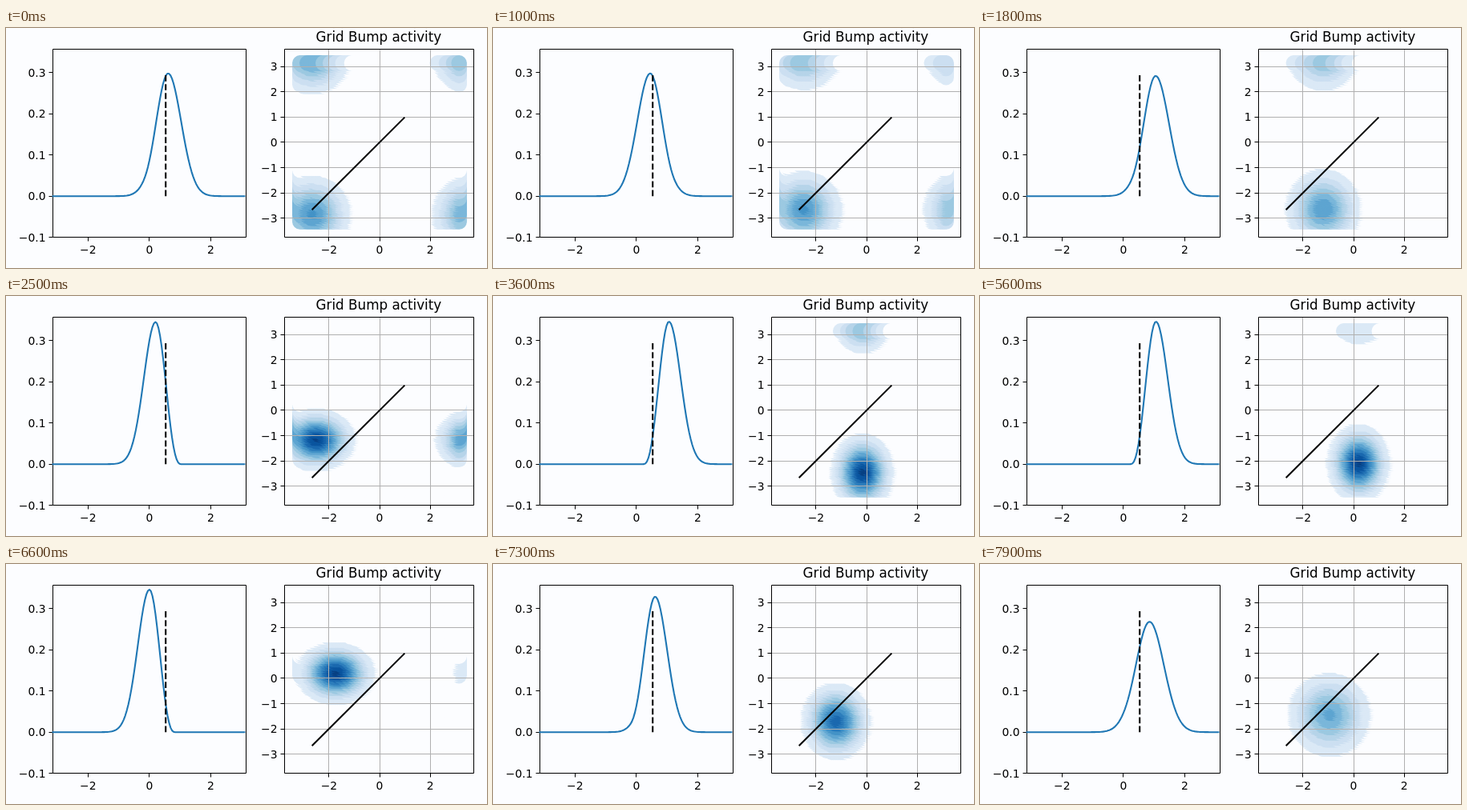
An HTML page with a canvas that plays this animation: 600x300 px, repeating every 8000 ms.

```html
<!DOCTYPE html>
<html lang="en">
<head>
<meta charset="utf-8">
<title>Grid Bump activity</title>
<style>
  html, body { margin: 0; width: 100%; height: 100%; overflow: hidden; background: #fcfdff; }
  canvas, svg { position: absolute; left: 0; top: 0; width: 600px; height: 300px; }
  text { font: 13.89px "DejaVu Sans", sans-serif; fill: #000; }
  .title { font-size: 16.78px; }
  .axis { fill: none; stroke: #000; stroke-width: 1; }
  .grid { fill: none; stroke: #b0b0b0; stroke-width: 1; }
  .bold { fill: none; stroke: #000; stroke-width: 2.08; }
  .curve { fill: none; stroke: #1f77b4; stroke-width: 2.08; stroke-linejoin: round; stroke-linecap: square; }
</style>
</head>
<body>
<canvas id="bump" width="600" height="300"></canvas>
<svg id="plot" viewBox="0 0 600 300"></svg>
<script>
const STEP = 100, STEPS = 80, TAU = 2 * Math.PI;
const BACK = "#fcfdff";

// One sweep lasts ten steps; sweeps alternate between left and right.
// A negative SHARP steepens the leading flank instead of the trailing one.
const SWING  = [-.08, -.02, .03, .08, .17, .33, .53, .6, .52, .32];
const HEIGHT = [.298, .308, .318, .329, .339, .345, .346, .328, .292, .268];
const SHARP  = [-.25, -.1, .2, .5, .8, 1, 1, .7, .3, .1];
const AHEAD  = [0, -.06, -.04, .15, .58, 1.23, 1.86, 2.1, 1.15, .29];
const ASIDE  = [0, -.05, -.1, -.17, -.24, -.29, -.26, -.22, -.12, -.02];

const leftX = v => 178.9 + 38.3 * v;
const leftY = v => 210.2 - 515 * v;
const rightX = v => 466 + 31.55 * v;
const rightY = v => 142.95 - 31.55 * v;
const snap = v => Math.floor(v) + .5;

const svg = document.getElementById("plot");
function add(tag, attrs, content) {
  const el = document.createElementNS("http://www.w3.org/2000/svg", tag);
  for (const name in attrs) el.setAttribute(name, attrs[name]);
  if (content) el.textContent = content;
  svg.append(el);
  return el;
}
const path = (cls, d) => add("path", { class: cls, d });
const label = (x, y, anchor, content) => add("text", { x, y, "text-anchor": anchor }, content);
const minus = s => String(s).replace("-", "\u2212");

function axes(x0, x1, toX, toY, yTicks, digits, grid) {
  let ticks = "", lines = "";
  for (const v of [-2, 0, 2]) {
    const x = snap(toX(v));
    ticks += `M${x} 261.5v5`;
    lines += `M${x} 26.5V261.5`;
    label(toX(v), 282, "middle", minus(v));
  }
  for (const v of yTicks) {
    const y = snap(toY(v));
    ticks += `M${x0} ${y}h-5`;
    lines += `M${x0} ${y}H${x1}`;
    label(x0 - 9, Math.round(toY(v) + 5.1), "end", minus(v.toFixed(digits)));
  }
  if (grid) path("grid", lines);
  path("axis", ticks + `M${x0} 26.5H${x1}V261.5H${x0}Z`);
}

axes(58.5, 299.5, leftX, leftY, [-.1, 0, .1, .2, .3], 1, false);
axes(347.5, 583.5, rightX, rightY, [-3, -2, -1, 0, 1, 2, 3], 0, true);
add("text", { class: "title", x: 464.9, y: 17, "text-anchor": "middle" }, "Grid Bump activity");
const curve = path("curve", "");
add("path", { class: "bold", d: `M199.2 ${leftY(0)}V58`, "stroke-dasharray": "7.7 3.33" });
add("path", { class: "bold", d: `M${rightX(-2.65)} ${rightY(-2.65)}L${rightX(.97)} ${rightY(.97)}`, "stroke-linecap": "square" });

const BLUES = ["f7fbff", "deebf7", "c6dbef", "9ecae1", "6baed6", "4292c6", "2171b5", "08519c", "08306b"]
  .map(hex => [0, 2, 4].map(i => parseInt(hex.slice(i, i + 2), 16)));

function blue(v) {
  const pos = Math.min(v, .999) * 8, i = Math.floor(pos), f = pos - i;
  return `rgb(${BLUES[i].map((c, n) => Math.round(c + (BLUES[i + 1][n] - c) * f))})`;
}
const EDGE = .06, BAND = .08;
const BANDS = Array.from({ length: 12 }, (_, i) => blue(.14 + i * BAND));
const shade = v => v < EDGE ? BACK : BANDS[Math.floor((v - EDGE) / BAND)];

function drawCurve(peak, dir, height, sharp) {
  const steep = Math.abs(sharp);
  const sigma = .125 / height * (1 + .05 * steep), points = [];
  for (let i = 0; i < 128; i++) {
    const x = -Math.PI + TAU * i / 128;
    const u = (x - peak) * dir;
    let y = Math.exp(-u * u / (2 * sigma * sigma));
    if (u * sharp < 0) {
      const cut = Math.abs(u) < .84 ? Math.cos(u / .84 * Math.PI / 2) ** 2.7 : 0;
      y += (cut - y) * steep;
    }
    points.push(leftX(x).toFixed(2) + " " + leftY(y * height).toFixed(2));
  }
  curve.setAttribute("d", "M" + points.join("L"));
}

const ctx = document.getElementById("bump").getContext("2d");
const wrap = d => d - TAU * Math.round(d / TAU);

// Overlapping discs on a periodic sheet, painted row by row from the bottom.
function drawBump(cx, cy, sx, sy, top) {
  const n = 90, at = i => -Math.PI + TAU * i / (n - 1);
  ctx.fillStyle = BACK;
  ctx.fillRect(0, 0, 600, 300);
  for (let j = 0; j < n; j++) {
    const dy = wrap(at(j) - cy) / sy;
    for (let i = 0; i < n; i++) {
      const dx = wrap(at(i) - cx) / sx;
      ctx.fillStyle = shade(top * Math.exp(-(dx * dx + dy * dy) / 2));
      ctx.beginPath();
      ctx.arc(rightX(at(i)), rightY(at(j)), 9.8, 0, TAU);
      ctx.fill();
    }
  }
}

function draw(step) {
  const i = step % 10, right = Math.floor(step / 10) % 2 === 1;
  const dir = right ? 1 : -1, h = HEIGHT[i], sharp = SHARP[i];
  drawCurve(.53 + dir * SWING[i], dir, h, sharp);

  const home = -2.58 + .018 * step;
  const main = home + AHEAD[i], side = home + ASIDE[i];
  const size = .217 / h, squeeze = Math.max(sharp, 0);
  const along = size * (1 - .14 * squeeze), across = size * (1 + .08 * squeeze);
  const top = .48 + .39 * ((h - .268) / .077) ** 1.7;
  if (right) drawBump(main, side, along, across, top);
  else drawBump(side, main, across, along, top);
}

let shown = -1;
function tick() {
  const step = Math.floor(performance.now() / STEP) % STEPS;
  if (step !== shown) draw(shown = step);
  requestAnimationFrame(tick);
}
tick();
</script>
</body>
</html>
```
